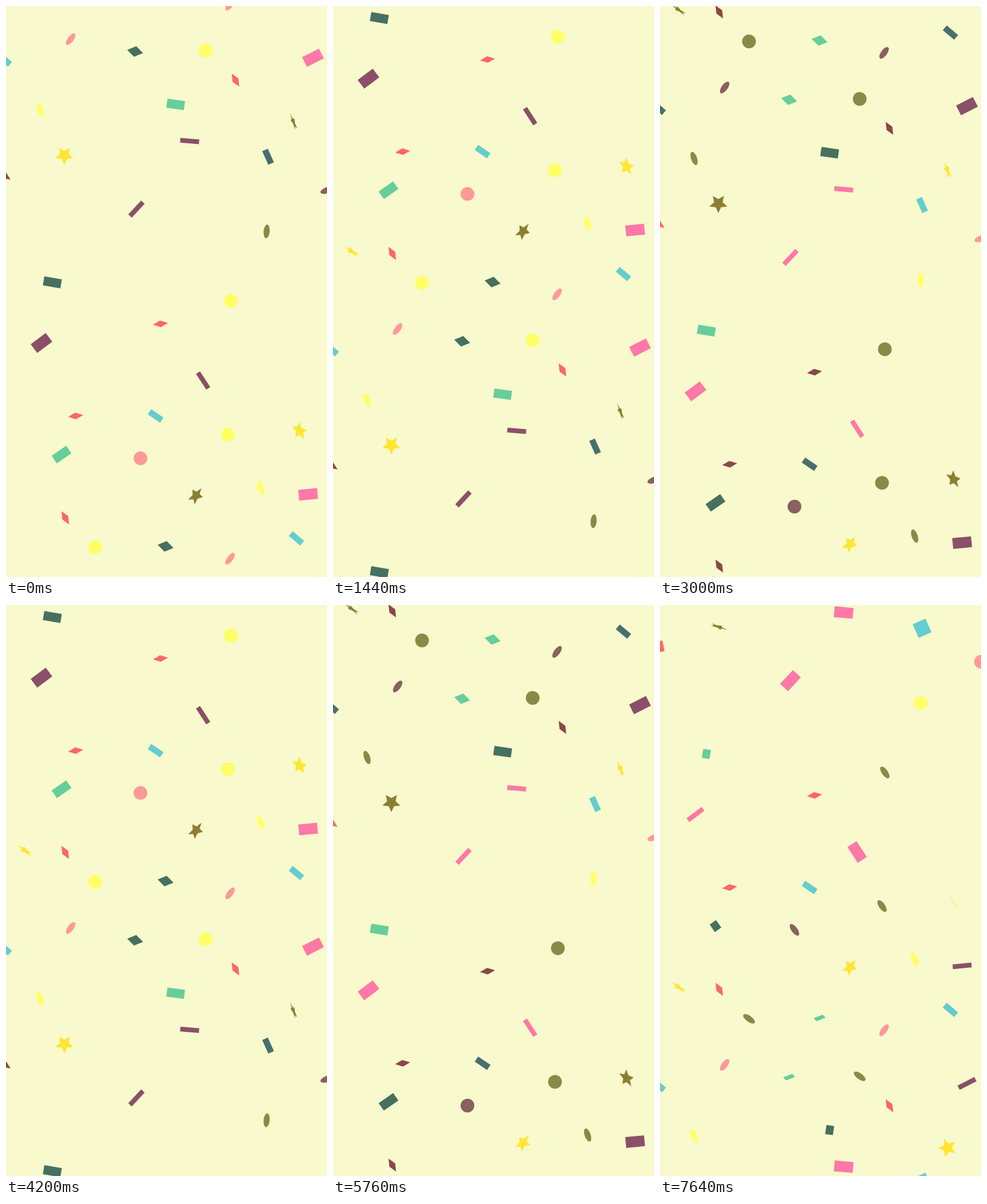
Write an HTML page with a canvas that moves like this. It is 561 px wide and 998 px high and loops after 7.68 s.

```html
<!DOCTYPE html>
<html lang="en">
<head>
<meta charset="utf-8">
<title>Falling confetti</title>
<style>
  html, body { margin: 0; width: 100%; height: 100%; overflow: hidden; background: #f8f9cc; }
  canvas { display: block; }
</style>
</head>
<body>
<canvas width="561" height="998"></canvas>
<script>
const canvas = document.querySelector('canvas');
const ctx = canvas.getContext('2d');
const LOOP = 7680, FRAME = 40, CYCLE = 69; // ms, ms, frames
const TILE = 968.5, FALL = 14.07;          // px, px per frame
const RAD = Math.PI / 180;

const box = (w, h) => () => ctx.rect(-w / 2, -h / 2, w, h);
const disc = () => ctx.arc(0, 0, 12, 0, 2 * Math.PI);
const radial = (tips, outer, inner) => () => {
  for (let i = 0; i < 2 * tips; i++) {
    const r = i % 2 ? inner : outer, a = Math.PI * i / tips;
    ctx.lineTo(r * Math.cos(a), r * Math.sin(a));
  }
  ctx.closePath();
};

// snap: how much the turn lingers face-on; lean: how far the front tips toward the viewer
const kind = (front, back, path, extra) =>
  ({ front, back, path, skew: 0, snap: .16, lean: 0, ...extra });
const strip = kind('#ff78a7', '#8a5068', box(33, 19));
const tile = kind('#64cdcf', '#46706f', box(26, 24.5));
const brick = kind('#66ce9a', '#467060', box(16, 31));
const slant = kind('#66ce9a', '#467060', box(17, 15.6), { skew: .42 });
const diamond = kind('#ff6666', '#8a4848', radial(2, 13.2, 9.33 * Math.SQRT2));
diamond.path = radial(4, 13.2, 13.2 * Math.SQRT1_2 ** 2 * Math.SQRT2);
diamond.path = () => { for (const a of [0, 90, 180, 270]) ctx.lineTo(13.2 * Math.cos(a * RAD), 13.2 * Math.sin(a * RAD)); };
const rose = kind('#ff9999', '#8a6060', disc);
const lemon = kind('#ffff66', '#8a8a48', disc);
const star = kind('#ffe633', '#8c7f33', radial(5, 16.5, 7.8), { snap: .6, lean: .06 });

// Pieces of one kind flip together, "wave" sixths of a turn late;
// the tilt of the flip axis grows by "step" from piece to piece.
const pieces = [];
function add(kind, wave, tilt, points, step = 0) {
  points.forEach(([x, y], i) => pieces.push({ kind, wave, tilt: tilt + i * step, x, y }));
}
// The same cluster appears twice, turned by half a turn.
const addTwins = (kind, wave, tilt, x, y) =>
  add(kind, wave, tilt, [[x, y], [504.6 - x, 1024 - y]]);

addTwins(rose, 1, -54, 113, 58);
addTwins(lemon, 0, 36, 349, 78);
addTwins(lemon, 1, 71, 59.5, 182);
addTwins(slant, 3, -22, 225.7, 79.5);
addTwins(tile, 1, 40, -3, 93.5);
addTwins(diamond, 1, 60, 401, 129.5);

add(strip, 0, -27, [[536.5, 90.5], [528, 853.5]], 21.5);
add(strip, 2, -47, [[228, 355], [321, 236], [344.5, 654.5]], 52);
add(strip, 3, -37, [[62, 589]]);
add(tile, 1, 34, [[261.5, 716.5]]);
add(tile, 2, 66, [[458, 263.5]]);
add(brick, 0, 55, [[97, 784], [296.5, 172]], 43);
add(brick, 3, 99.5, [[81, 483]]);
add(diamond, 1, -7, [[270, 555.5], [121.7, 716.5]]);
add(diamond, 2, 34, [[-3, 296]]);
add(rose, 0, 54, [[235, 790.5]]);
add(rose, 2, -20, [[561, 322]]);
add(lemon, 0, 55, [[393, 515.5], [388, 749]]);
add(lemon, 2, -85, [[455.5, 394]]);
add(star, 0, 18, [[102, 261]]);
add(star, .5, 60, [[513, 742.5]]);
add(star, 1, 215, [[33, -77.5]]);
add(star, 2, 249, [[502.5, 203]]);
add(star, 2.5, -54, [[332, 856]]);

function drawPiece({ kind, wave, tilt, x, y }, drop, turn) {
  const c = Math.cos((turn - wave) * 60 * RAD), c2 = c * c;
  const flip = c * (1 - kind.snap * (1 - c2)) + kind.lean * (1 - c2);
  ctx.fillStyle = flip > 0 ? kind.front : kind.back;
  for (const top of [0, -TILE]) {
    ctx.setTransform(1, 0, 0, 1, x, y + top + drop);
    ctx.rotate(tilt * RAD);
    ctx.transform(1, 0, kind.skew, 1, 0, 0);
    ctx.scale(1, flip);
    ctx.beginPath();
    kind.path();
    ctx.fill();
  }
}

const start = performance.now();
function draw() {
  const t = (performance.now() - start) % LOOP;
  const step = Math.floor(t / FRAME) % CYCLE;
  const turn = Math.floor(step / 2); // each flip pose holds for two frames
  ctx.resetTransform();
  ctx.clearRect(0, 0, canvas.width, canvas.height);
  for (const piece of pieces) drawPiece(piece, step * FALL, turn);
  requestAnimationFrame(draw);
}
draw();
</script>
</body>
</html>
```
